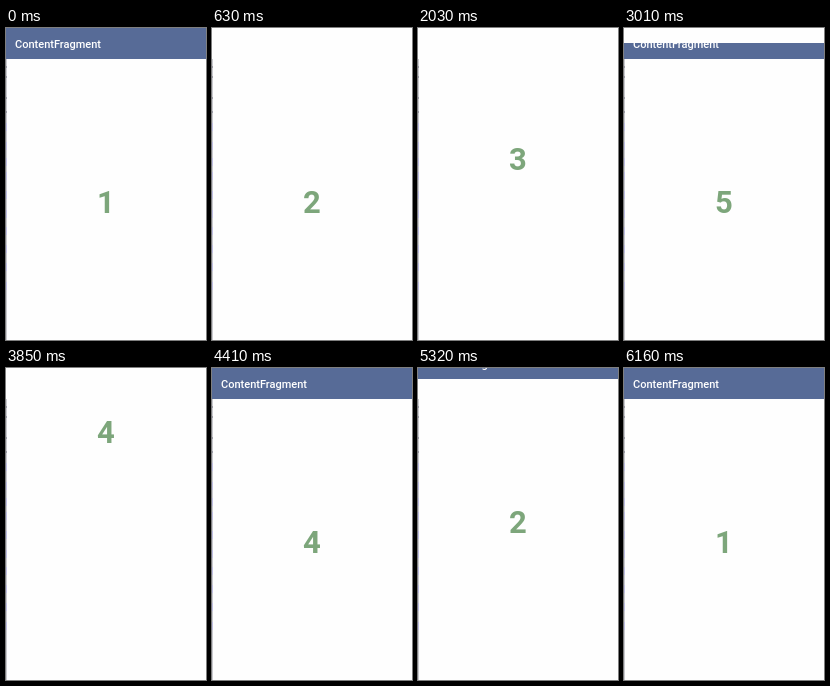
An HTML page that plays this animation: 200 px wide and 312 px high, repeating every 6.58 s.

```html
<!DOCTYPE html>
<html lang="en">
<head>
<meta charset="utf-8">
<title>Swipe pages</title>
<style>
  html, body { margin: 0; width: 100%; height: 100%; overflow: hidden; background: #fefefe; }
  svg { display: block; width: 100%; height: 100%; }
  text { font-family: Roboto, sans-serif; }
  .paper { fill: #fefefe; }
  .bar { fill: #576b97; }
  .title { fill: #fff; font-size: 11px; font-weight: 500; }
  .digit { fill: #7da67b; font-size: 31px; font-weight: 700; text-anchor: middle; }
</style>
</head>
<body>
<svg viewBox="0 0 200 312">
  <g id="below"></g>
  <g id="sheet"></g>
  <g id="edge"></g>
</svg>
<script>
const LOOP = 6580, STEP = 70, HEIGHT = 312, BAR = 31, POWER = 3.55;

// Start and end of each swipe: four pages up, then the same four back down.
const UPS = 4;
const swipes = [
  [415, 1050], [1253.8, 1820], [2012, 2450], [2725, 3220],
  [3635, 4480], [4475, 4990], [4993, 5600], [5735, 6160]
];

const byId = id => document.getElementById(id);
const rect = (x, y, w, h, attrs) =>
  `<rect x="${x}" y="${y}" width="${w}" height="${h}" ${attrs}/>`;

function buildPage(group) {
  group.innerHTML =
    rect(0, 0, 200, HEIGHT, 'class="paper"') +
    rect(0, 0, 200, BAR, 'class="bar"') +
    '<text class="title" x="9" y="20">ContentFragment</text>' +
    '<text class="digit" x="100" y="185"></text>';
  return { group, digit: group.querySelector('.digit') };
}

// Thin strip of the window behind, along the left side.
function buildEdge(group) {
  let seed = 7;
  const random = () => (seed = seed * 16807 % 2147483647) / 2147483647;
  let strip = rect(0, BAR, 1, HEIGHT - BAR, 'fill="#c9c9ce"');
  for (let y = 38; y < 256; y += 10 + 12 * random()) {
    const color = y < 95 ? '#9a9aa4' : '#bdbce0';
    strip += rect(0, Math.round(y), 1, y < 95 ? 2 : 8, `fill="${color}"`);
  }
  group.innerHTML = strip;
}

const below = buildPage(byId('below'));
const sheet = buildPage(byId('sheet'));
buildEdge(byId('edge'));

function draw(ms) {
  const t = Math.floor(ms % LOOP / STEP) * STEP;
  const i = Math.max(0, swipes.findLastIndex(([start]) => start <= t));
  const [start, end] = swipes[i];
  const progress = Math.min(1, Math.max(0, (t - start) / (end - start)));
  const left = (1 - progress) ** POWER;
  const up = i < UPS;
  const number = up ? i + 1 : 2 * UPS - i;
  const offset = Math.round(HEIGHT * (up ? 1 - left : left));
  sheet.digit.textContent = number;
  below.digit.textContent = number + 1;
  sheet.group.setAttribute('transform', `translate(0 ${-offset})`);
}

const origin = performance.now();
function tick() {
  draw(performance.now() - origin);
  requestAnimationFrame(tick);
}
tick();
</script>
</body>
</html>
```
